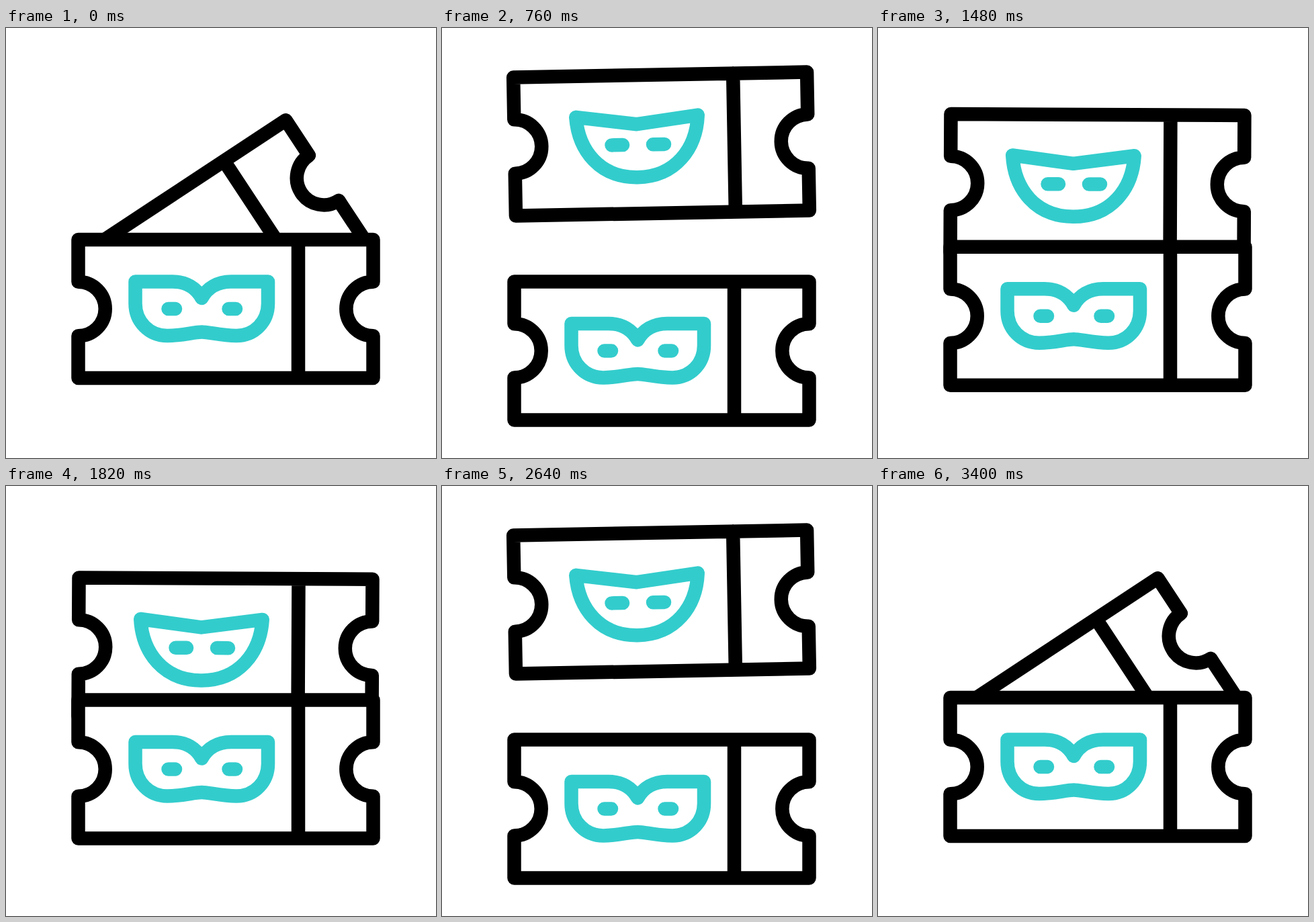
These frames come from a looping animation (640 by 640 pixels, 3620 ms). An HTML page:

```html
<!DOCTYPE html>
<html lang="en">
<head>
<meta charset="utf-8">
<title>Theatre tickets</title>
<style>
  html, body { margin: 0; height: 100%; overflow: hidden; background: #fff; }
  svg { display: block; width: 640px; height: 640px; }
  path { stroke: #000; stroke-width: 20.5; stroke-linecap: round; stroke-linejoin: round; fill: #fff; }
  .mask { stroke: #3cc; fill: none; }
</style>
</head>
<body>
<svg viewBox="0 0 640 640">
  <g id="back">
    <path id="backBody"/>
    <path id="backMask" class="mask" d="M-126.5-42L-36-30L55-42C52 8 20 49-36 49S-123.5 8-126.5-42ZM-74 .5h16.5M-12.5 .5h17"/>
  </g>
  <g id="front">
    <path id="frontBody"/>
    <path class="mask" d="M192.5 377.5H248C268 377.5 283 387 291.3 402C299.500 387 315 377.500 335 377.5H390V410C390 437 370 458 343 458C320 458 302 452.500 291.3 452.5C280 452.500 262 458 240 458C213 458 192.500 437 192.5 410ZM241.500 418h10.500M331.500 418h10.500"/>
  </g>
</svg>
<script>
const LOOP = 3620, PLAY = 3400, HALF = 1700, RISE = 850, UNFOLD = 340;
const $ = id => document.getElementById(id);
const mix = (a, b, k) => a + (b - a) * k;
const ease = x => {
  const u = Math.min(1, Math.max(0, x));
  return u * u * (3 - 2 * u);
};

// Outline with a round notch on both sides, plus the tear line.
const ticket = (left, right, tear, cy = 0) =>
  `M${left} ${cy - 103}H${right}V${cy - 40.2}a40.2 40.2 0 0 0 0 80.4V${cy + 103}` +
  `H${left}V${cy + 40.2}a40.2 40.2 0 0 0 0-80.4ZM${tear} ${cy - 103}v206`;

$("frontBody").setAttribute("d", ticket(107.5, 546.5, 435, 418));

function draw(time) {
  // The second half mirrors the first.
  const t = HALF - Math.abs(HALF - Math.min(time, PLAY));
  const rise = ease(t / RISE), fall = ease((t - RISE) / RISE);
  const folded = 1 - ease(t / UNFOLD);

  $("front").setAttribute("transform", `translate(0 ${64.4 * (rise - fall)})`);

  const y = mix(319.8, 167.8, rise) + 77 * fall;
  const angle = -33.4 * (1 - rise) + 0.3 * fall;
  $("back").setAttribute("transform", `translate(326.5 ${y}) rotate(${angle})`);

  const inset = 43 * folded;
  $("backBody").setAttribute("d", ticket(-218.5 + 0.85 * inset, 218.5 - inset, 108.5 - inset));
  $("backMask").setAttribute("transform", `translate(0 ${78 * folded})`);
}

function tick() {
  const time = performance.now() % LOOP;
  draw(time - time % 20);
  requestAnimationFrame(tick);
}
tick();
</script>
</body>
</html>
```
